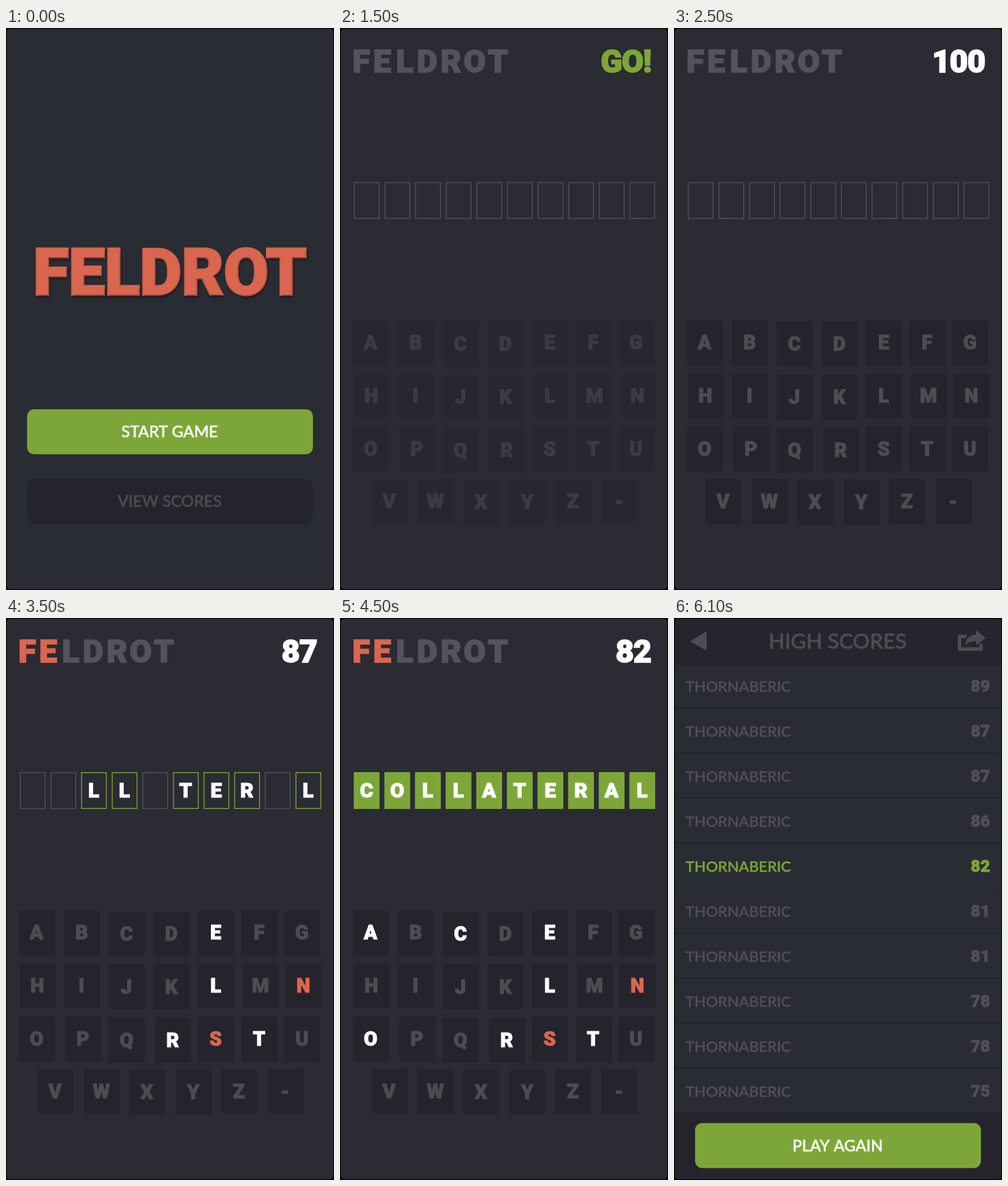
Recreate the animation shown at these times as an HTML page with a canvas. Size 482 by 824 pixels, loop 6500 ms.

```html
<!DOCTYPE html>
<html lang="en">
<head>
<meta charset="utf-8">
<title>Word game</title>
<style>
html, body { margin: 0; width: 100%; height: 100%; overflow: hidden; background: #000; }
canvas { display: block; }
</style>
</head>
<body>
<canvas width="482" height="824"></canvas>
<script>
const ctx = document.querySelector('canvas').getContext('2d');
// "weight" is the outline that thickens the glyphs, relative to the font size.
const HEAVY = { css: '900 SIZEpx Roboto, sans-serif', weight: .035 };
const LIGHT = { css: '500 SIZEpx Lato, sans-serif', weight: .022 };
const C = {
  slate: '#2a2c34', plum: '#2b2b34', dark: '#25242c', bar: '#26252d', line: '#24242b',
  gray: '#4d4d51', row: '#4f4f57', dim: '#53525d', green: '#7ca738', red: '#da664f', white: '#fff'
};
const GAME = 'FELDROT';
const PLAYER = 'THORNABERIC';
const WORD = 'COLLATERAL';
const SCORES = [89, 87, 87, 86, 82, 81, 81, 78, 78, 75];
const TITLE_X = [31, 62, 95, 128, 163, 198, 232];
const KEY_ROWS = [
  { letters: 'ABCDEFG', y: 428.5, x: [19, 85, 151, 217, 282, 346, 409] },
  { letters: 'HIJKLMN', y: 506.5, x: [20, 85, 151, 217, 282, 348, 411] },
  { letters: 'OPQRSTU', y: 584.5, x: [19, 87, 151, 219, 282, 346, 409] },
  { letters: 'VWXYZ-', y: 661, x: [46, 114, 181, 249, 316, 384] }
];

function text(str, x, y, size, color, { font = LIGHT, align = 'left', spacing = 0 } = {}) {
  ctx.font = font.css.replace('SIZE', size);
  ctx.textAlign = align;
  ctx.letterSpacing = spacing + 'px';
  ctx.lineJoin = 'miter';
  ctx.lineWidth = size * font.weight;
  ctx.fillStyle = ctx.strokeStyle = color;
  ctx.strokeText(str, x, y);
  ctx.fillText(str, x, y);
}

function box(x, y, w, h, color, radius = 0) {
  ctx.fillStyle = color;
  ctx.beginPath();
  ctx.roundRect(x, y, w, h, radius);
  ctx.fill();
}

function polygon(points, color) {
  ctx.fillStyle = color;
  ctx.beginPath();
  points.forEach(([x, y]) => ctx.lineTo(x, y));
  ctx.fill();
}

function withShadow(blur, draw) {
  ctx.save();
  ctx.shadowColor = 'rgba(0,0,0,.4)';
  ctx.shadowOffsetX = 1;
  ctx.shadowOffsetY = 2;
  ctx.shadowBlur = blur;
  draw();
  ctx.restore();
}

function button(label, y, fill, color) {
  box(31, y, 420, 66, fill, 10);
  text(label, 240.5, y + 41, 23.2, color, { align: 'center' });
}

function background(color) {
  box(0, 0, 482, 824, '#000');
  box(1, 1, 480, 822, color, 5);
}

function header(title) {
  box(1, 1, 480, 69, C.bar, [5, 5, 0, 0]);
  polygon([[23.5, 34], [48, 19.5], [48, 48]], C.gray);
  text(title, 240.5, 45, 31, C.gray, { align: 'center' });
}

function shareIcon() {
  ctx.strokeStyle = C.gray;
  ctx.lineWidth = 5;
  ctx.beginPath();
  [[430, 27], [419.5, 27], [419.5, 45.5], [451, 45.5], [451, 38]].forEach(p => ctx.lineTo(...p));
  ctx.stroke();
  ctx.fillStyle = C.gray;
  ctx.fill(new Path2D('M458 29 L444 18 V24 Q429 25 428 40 Q434 33 444 34 V40 Z'));
}

function menu() {
  background(C.slate);
  withShadow(3, () => text(GAME, 241, 391, 95, C.red, { font: HEAVY, align: 'center' }));
  button('START GAME', 559, C.green, C.white);
  button('VIEW SCORES', 661, C.dark, C.gray);
}

function difficulty() {
  background(C.plum);
  header('NEW GAME');
  text('SELECT WORD DIFFICULTY', 31, 113, 22.5, C.red);
  box(16, 135, 450, 290, C.dark, 10);
  ['EASY', 'MEDIUM', 'HARD'].forEach((label, i) => {
    text(label, 31, 191.5 + 97.5 * i, 22.5, C.gray);
    if (i) box(16, 133 + 97.5 * i, 450, 2, '#2a2931');
  });
}

function keyboard(hits, misses, opacity) {
  for (const { letters, x, y } of KEY_ROWS) {
    [...letters].forEach((letter, i) => {
      const top = y + (i === 2 || i === 3 ? 1.5 : 0);
      const color = hits.includes(letter) ? C.white : misses.includes(letter) ? C.red : C.gray;
      ctx.globalAlpha = opacity;
      box(x[i], top, 53, 66, C.dark);
      text(letter, x[i] + 26, top + 42.5, 29, color, { font: HEAVY, align: 'center' });
    });
  }
  ctx.globalAlpha = 1;
}

function board({ score, color = C.white, hits = '', misses = '', solved = false, keys = 1 }) {
  background(C.plum);
  [...GAME].forEach((letter, i) =>
    text(letter, TITLE_X[i], 64.5, 47, i < misses.length ? C.red : C.dim, { font: HEAVY, align: 'center' }));
  text(score, 457, 64.5, 46.5, color, { font: HEAVY, align: 'right', spacing: -1 });
  [...WORD].forEach((letter, i) => {
    const x = 20.5 + 45 * i;
    const known = hits.includes(letter);
    if (solved) box(x, 226, 37.5, 54, C.green);
    ctx.strokeStyle = known ? C.green : C.dim;
    ctx.lineWidth = 1.3;
    ctx.strokeRect(x + .6, 226.7, 36.4, 52.6);
    if (known) text(letter, x + 18.5, 262.5, 30, C.white, { font: HEAVY, align: 'center' });
  });
  keyboard(hits, misses, keys);
}

function highScores() {
  background(C.slate);
  header('HIGH SCORES');
  shareIcon();
  SCORES.forEach((score, i) => {
    const color = i === 4 ? C.green : C.row;
    const y = 107.5 + 66 * i;
    text(PLAYER, 17, y, 22, color);
    text(score, 464.5, y, 24.5, color, { font: HEAVY, align: 'right' });
    box(1, y + 23.5, 480, 2, C.line);
  });
  box(1, 726, 480, 97, C.dark, [0, 0, 5, 5]);
  button('PLAY AGAIN', 740.5, C.green, C.white);
}

const SCENES = [
  [500, menu],
  [1500, difficulty],
  [2500, () => board({ score: 'GO!', color: C.green, keys: .5 })],
  [3500, () => board({ score: '100' })],
  [4500, () => board({ score: '87', hits: 'ELRT', misses: 'NS' })],
  [5500, () => board({ score: '82', hits: 'ELRTACO', misses: 'NS', solved: true })],
  [6500, highScores]
];

function frame() {
  const time = performance.now() % 6500;
  SCENES.find(([end]) => time < end)[1]();
  requestAnimationFrame(frame);
}
frame();
</script>
</body>
</html>
```
